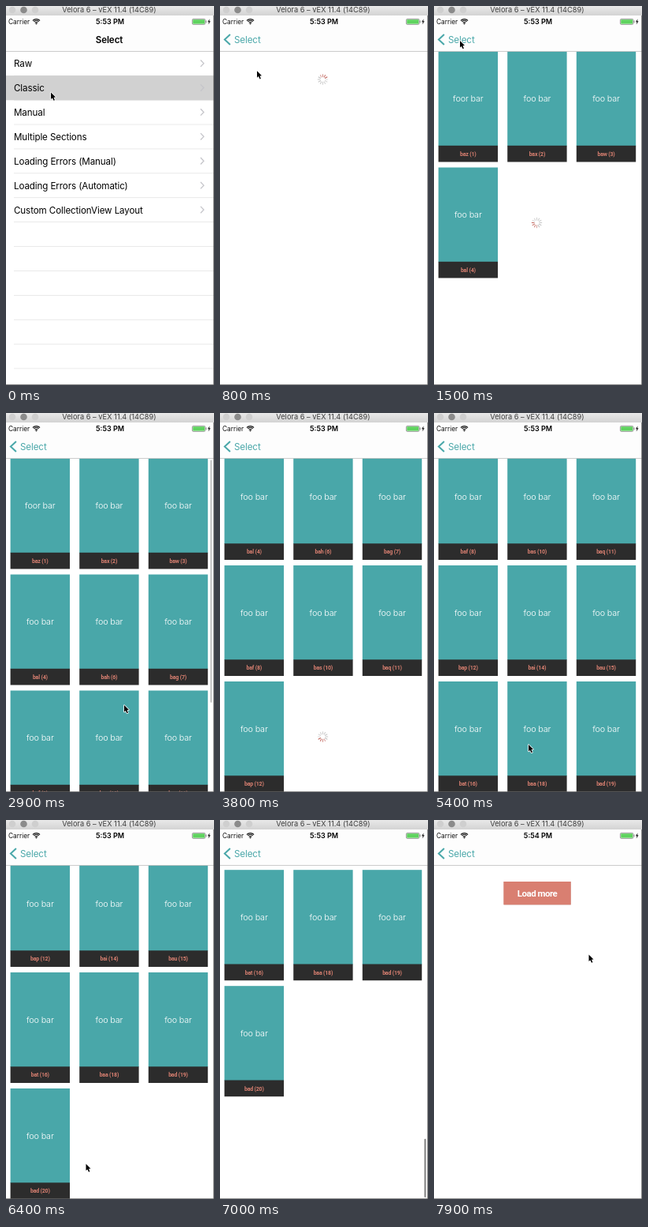
Animation, 264 px wide and 480 px high, one loop 8 s. Source, as an HTML page with a canvas:

```html
<!DOCTYPE html>
<html lang="en">
<head>
<meta charset="utf-8">
<title>Paged collection demo</title>
<style>
html, body { margin: 0; width: 100%; height: 100%; overflow: hidden; background: #fff; }
canvas { display: block; width: 264px; height: 480px; }
</style>
</head>
<body>
<canvas id="stage"></canvas>
<script>
const W = 264, H = 480, LOOP = 8000, STEP = 100;
const NAV_TOP = 12, NAV_END = 57.5, VIEW_H = H - NAV_END;
const TEAL = '#49a7a9', DARK = '#2c2c2c', SALMON = '#da8071';
const SANS = 'Inter, "Liberation Sans", sans-serif';
const COND = 'Roboto, "Liberation Sans", sans-serif';
const CELL_W = 75.4, CELL_H = 140, COL = 87.6, ROW = 147, LINE = 30.9;

const MENU = ['Raw', 'Classic', 'Manual', 'Multiple Sections', 'Loading Errors (Manual)',
  'Loading Errors (Automatic)', 'Custom CollectionView Layout'];
const NAMES = 'baz bax baw bal bah bag baf bas baq bap bai bau bat baa bad bad'.split(' ');
const PAGE_TIMES = [900, 1900, 2700, 4000, 5400];

const canvas = document.getElementById('stage');
const ctx = canvas.getContext('2d');
const dpr = window.devicePixelRatio || 1;
canvas.width = W * dpr;
canvas.height = H * dpr;

const clamp = x => Math.max(0, Math.min(1, x));
const mix = (a, b, p) => a + (b - a) * p;
const easeOut = p => 1 - (1 - p) ** 3;
const smooth = p => p * p * (3 - 2 * p);
const span = (t, a, b) => clamp((t - a) / (b - a));

// Keys are [time, value, ...]; each stretch is eased.
function track(t, keys, ease) {
  if (t <= keys[0][0]) return keys[0].slice(1);
  for (let i = 1; i < keys.length; i++) {
    const a = keys[i - 1], b = keys[i];
    if (t <= b[0]) {
      const p = ease(span(t, a[0], b[0]));
      return a.slice(1).map((v, k) => mix(v, b[k + 1], p));
    }
  }
  return keys[keys.length - 1].slice(1);
}

const SCROLL = [[2900, 0], [3300, 158.5], [4000, 158.5], [4500, 305.5], [5500, 305.5],
  [5950, 452.5], [6500, 452.5], [7000, 582.3], [7050, 582.3], [7300, 452.5]];
const POINTER = [[0, 57, 109.5], [400, 57, 109.5], [1300, 33, 44], [1500, 33, 44], [2400, 150, 370],
  [2900, 150, 370], [3300, 150, 225], [4000, 185, 320], [4500, 185, 166.5], [4900, 185, 166.5],
  [5400, 120, 420], [5900, 110, 270], [6300, 101.5, 435.5], [6500, 101.5, 435.5], [7200, 33, 44],
  [7400, 33, 44], [7600, 130, 135], [7700, 130, 135], [7900, 196.5, 170.5]];

function rect(x, y, w, h, color) {
  ctx.fillStyle = color;
  ctx.fillRect(x, y, w, h);
}

function disc(x, y, r, color) {
  ctx.fillStyle = color;
  ctx.beginPath();
  ctx.arc(x, y, r, 0, 7);
  ctx.fill();
}

function text(str, x, y, size, color, { weight = 400, align = 'left', gap = 0, font = SANS } = {}) {
  ctx.font = `${weight} ${size}px ${font}`;
  ctx.letterSpacing = gap + 'px';
  ctx.textAlign = align;
  ctx.fillStyle = color;
  ctx.fillText(str, x, y);
}

function poly(points, close) {
  ctx.beginPath();
  points.forEach(([x, y]) => ctx.lineTo(x, y));
  if (close) ctx.closePath();
}

function chevron(x, y, w, h, color, width) {
  poly([[x, y - h], [x + w, y], [x, y + h]]);
  ctx.strokeStyle = color;
  ctx.lineWidth = width;
  ctx.stroke();
}

function faded(alpha, draw) {
  if (alpha <= 0) return;
  ctx.save();
  ctx.globalAlpha *= alpha;
  draw();
  ctx.restore();
}

function windowBar() {
  const g = ctx.createLinearGradient(0, 0, 0, NAV_TOP);
  g.addColorStop(0, '#e9e9e9');
  g.addColorStop(1, '#d3d3d3');
  rect(0, 0, W, NAV_TOP, g);
  disc(8, 5, 4.3, '#cfcfcf');
  disc(22.5, 5, 4.3, '#8b8b8b');
  disc(37, 5, 4.3, '#cfcfcf');
  text('Velora 6 – vEX 11.4 (14C89)', 131, 8.4, 9.2, '#3c3c3c', { align: 'center', gap: 0.04 });
}

function statusBar(t) {
  text('Carrier', 3, 23, 8.3, '#111');
  ctx.strokeStyle = '#111';
  ctx.lineWidth = 1.2;
  for (const r of [2.4, 4.4, 6.4]) {
    ctx.beginPath();
    ctx.arc(38.5, 23, r, -Math.PI * 0.75, -Math.PI * 0.25);
    ctx.stroke();
  }
  disc(38.5, 22.4, 0.9, '#111');
  text(t < 7500 ? '5:53 PM' : '5:54 PM', 132, 23, 9, '#000', { weight: 600, align: 'center' });
  ctx.strokeStyle = '#777';
  ctx.lineWidth = 0.7;
  ctx.beginPath();
  ctx.roundRect(236.4, 16.4, 16.5, 7, 1.4);
  ctx.stroke();
  rect(237.2, 17.2, 14.9, 5.4, '#5fd35f');
  rect(253.4, 18.5, 1, 2.8, '#777');
  poly([[258.6, 16.3], [256, 20.3], [257.6, 20.3], [256.8, 23.6], [259.6, 19.3], [258, 19.3]], true);
  ctx.fillStyle = '#111';
  ctx.fill();
}

// p: 0 shows the menu title, 1 shows the back button.
function navBar(t, p) {
  rect(0, NAV_TOP, W, NAV_END - NAV_TOP, '#fdfdfd');
  rect(0, 57, W, 0.7, '#b8b8b8');
  statusBar(t);
  faded(1 - p, () => text('Select', mix(131, 35, p), 46.6, 11.6, '#000',
    { weight: 600, align: 'center', gap: -0.08 }));
  faded(p, () => {
    chevron(12.9, 42.5, -7, 6.6, TEAL, 2);
    text('Select', mix(112, 18, p), 46.8, 11.6, TEAL, { gap: -0.1 });
  });
}

function menu(x, picked) {
  ctx.save();
  ctx.translate(x, 0);
  rect(0, NAV_END, W, VIEW_H, '#fff');
  for (let i = 1; i <= 13; i++) rect(10, NAV_END + i * LINE - 0.5, W, 0.7, '#e0e0e0');
  if (picked >= 0) rect(0, NAV_END + picked * LINE - 0.3, W, LINE + 0.3, '#d1d1d1');
  MENU.forEach((label, i) => {
    const y = NAV_END + (i + 0.5) * LINE;
    text(label, 10, y + 4.2, 11.6, '#000', { gap: -0.1 });
    chevron(247, y - 0.3, 4, 4.2, '#c5c5ca', 1.3);
  });
  ctx.restore();
}

function spinner(x, y, t) {
  const head = Math.floor(t / STEP) + 6;
  ctx.lineWidth = 1.1;
  ctx.lineCap = 'round';
  for (let i = 0; i < 12; i++) {
    const age = (((head - i) % 12) + 12) % 12;
    const a = i * Math.PI / 6 - Math.PI / 2;
    const c = Math.cos(a), s = Math.sin(a);
    ctx.strokeStyle = age < 4 ? `rgba(190,95,85,${0.95 - age * 0.13})`
      : `rgba(125,125,125,${0.6 - age * 0.03})`;
    ctx.beginPath();
    ctx.moveTo(x + c * 3.4, y + s * 3.4);
    ctx.lineTo(x + c * 6.2, y + s * 6.2);
    ctx.stroke();
  }
  ctx.lineCap = 'butt';
}

function cell(i, x, y) {
  const num = i < 4 ? i + 1 : i + 1 + Math.floor((i - 1) / 3);
  const mid = x + CELL_W / 2;
  rect(x, y, CELL_W, 120, TEAL);
  rect(x, y + 119.3, CELL_W, CELL_H - 119.3, DARK);
  text(i ? 'foo bar' : 'foor bar', mid, y + 63.8, 10.8, '#fff',
    { weight: 300, align: 'center', gap: -0.15 });
  text(`${NAMES[i]} (${num})`, mid, y + 132.4, 7, SALMON,
    { weight: 700, align: 'center', gap: -0.2, font: COND });
}

function scrollBar(scroll, rows, alpha) {
  const content = Math.max(rows * ROW - 7, VIEW_H);
  const end = content - VIEW_H;
  const full = VIEW_H * VIEW_H / content;
  const h = full - Math.max(0, scroll - end);
  const y = mix(NAV_END + 2, 478 - full, end ? clamp(scroll / end) : 0) + full - h;
  faded(alpha, () => {
    ctx.fillStyle = '#7f7f7f';
    ctx.beginPath();
    ctx.roundRect(259.4, y, 2, h, 1);
    ctx.fill();
  });
}

function barAlpha(t) {
  return Math.max(...[[2900, 3350], [4050, 4650], [5500, 6000], [6550, 7300]]
    .map(([a, b]) => Math.min(span(t, a - 50, a + 50), 1 - span(t, b, b + 300))));
}

function grid(x, t) {
  const pages = PAGE_TIMES.filter(p => t >= p).length;
  const count = pages ? pages * 3 + 1 : 0;
  const [scroll] = track(t, SCROLL, easeOut);
  ctx.save();
  ctx.translate(x, 0);
  rect(0, NAV_END, W, VIEW_H, '#fff');
  for (let i = 0; i < count; i++) {
    const y = NAV_END + Math.floor(i / 3) * ROW - scroll;
    if (y > -CELL_H && y < H) cell(i, 5.6 + i % 3 * COL, y);
  }
  if (!count) spinner(130.5, 93, t);
  else if (pages < 5) spinner(130.5, NAV_END + pages * ROW + 70 - scroll, t);
  if (count) scrollBar(scroll, pages + 1, barAlpha(t));
  ctx.restore();
}

function manual(x) {
  ctx.save();
  ctx.translate(x, 0);
  rect(0, NAV_END, W, VIEW_H, '#fff');
  rect(88.5, 78, 85.2, 29.5, '#c98a80');
  rect(88.5, 78, 85, 29, '#d97f71');
  text('Load more', 131, 97, 11.5, '#fff', { weight: 700, align: 'center', gap: -0.5, font: COND });
  ctx.restore();
}

function pointer(t) {
  if ((t >= 3500 && t < 4000) || (t >= 6600 && t < 7200)) return;
  const [x, y] = track(t, POINTER, smooth);
  poly([[0, 0], [0, 8.6], [1.9, 6.9], [3.5, 10.3], [4.9, 9.7], [3.5, 6.3], [6, 6.1]]
    .map(([a, b]) => [x + a, y + b]), true);
  ctx.lineJoin = 'round';
  ctx.strokeStyle = '#fff';
  ctx.lineWidth = 1.5;
  ctx.stroke();
  ctx.fillStyle = '#000';
  ctx.fill();
  ctx.lineJoin = 'miter';
}

function draw(t) {
  ctx.setTransform(dpr, 0, 0, dpr, 0, 0);
  rect(0, 0, W, H, '#fff');
  const late = t >= 7550;
  const depth = late ? easeOut(span(t, 7600, 7850))
    : easeOut(span(t, 50, 400)) * (1 - easeOut(span(t, 7250, 7500)));
  const picked = late ? 2 : t < 1000 ? 1 : -1;
  if (depth < 1) menu(-80 * depth, picked);
  if (depth > 0) late ? manual(W * (1 - depth)) : grid(W * (1 - depth), t);
  navBar(t, depth);
  windowBar();
  rect(263.3, NAV_TOP, 0.7, H - NAV_TOP, '#555');
  rect(0, 479.3, W, 0.7, '#666');
  pointer(t);
}

const start = performance.now();
function frame() {
  const t = (performance.now() - start) % LOOP;
  draw(Math.floor(t / STEP) * STEP);
  requestAnimationFrame(frame);
}
frame();
</script>
</body>
</html>
```
